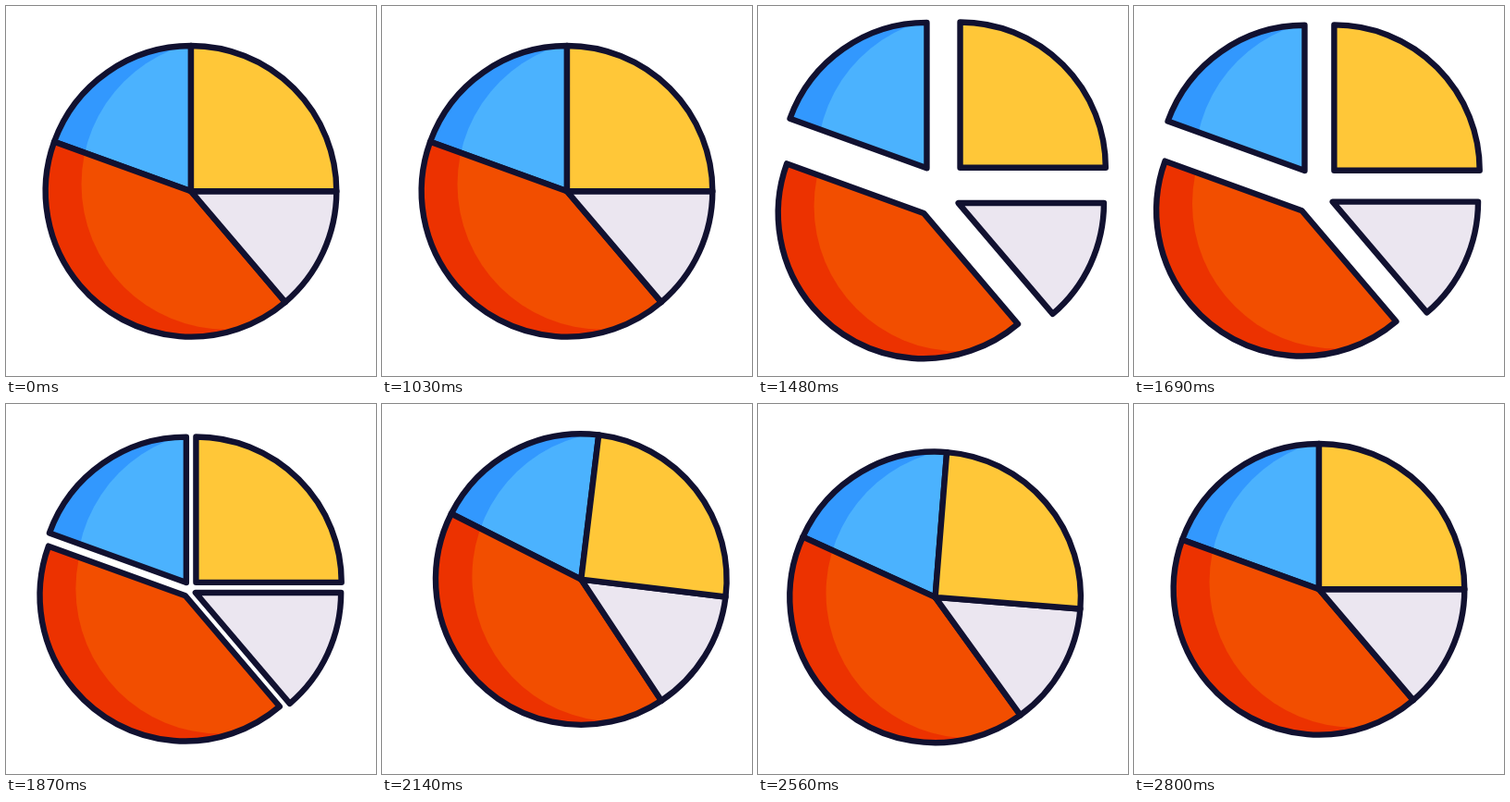
Recreate the animation shown at these times as an HTML page with a canvas. Size 400 by 400 pixels, loop 2.83 s.

```html
<!DOCTYPE html>
<html>
<head>
<meta charset="utf-8">
<style>
html, body { margin: 0; width: 100%; height: 100%; overflow: hidden; background: #fff; }
canvas { display: block; width: 400px; height: 400px; }
</style>
</head>
<body>
<canvas id="stage" width="400" height="400"></canvas>
<script>
const ctx = document.getElementById('stage').getContext('2d');
const LOOP = 2830, START = 1030, STEP = 30;
const CX = 200, CY = 200.3, R = 157.3;
const INK = '#111130';

// Angles in degrees, clockwise from the right; dx, dy is the burst offset.
const slices = [
  { from: 199.9, to: 270, dx: -17.6, dy: -25.2, fill: '#4bb2fe', shade: '#3298fe' },
  { from: 49.6, to: 199.9, dx: -21, dy: 23.7, fill: '#f24e00', shade: '#ec3200' },
  { from: 0, to: 49.6, dx: 16.7, dy: 12.8, fill: '#ebe6f0' },
  { from: 270, to: 360, dx: 18.6, dy: -25.6, fill: '#ffc738' }
];

// Keys are [step, value] pairs, eased in and out between neighbours.
const burst = [[0, 0], [15.5, 1], [19, 1], [33, 0]];
const shiftX = [[30, 0], [39, 17.5], [41.5, 17.5], [49.5, -9], [59, 0]];
const shiftY = [[30, 0], [39, -12.3], [41.5, -12.3], [49.5, 9.2], [59, 0]];
const turn = [[30, 0], [41.5, 10.5], [59, 0]];

const rad = deg => deg * Math.PI / 180;

function valueAt(keys, k) {
  if (k <= keys[0][0]) return keys[0][1];
  for (let i = 1; i < keys.length; i++) {
    const [a, va] = keys[i - 1], [b, vb] = keys[i];
    if (k <= b) {
      const x = (k - a) / (b - a);
      return va + (vb - va) * x * x * (3 - 2 * x);
    }
  }
  return keys[keys.length - 1][1];
}

function drawSlice(s, spread) {
  const path = new Path2D();
  path.moveTo(CX, CY);
  path.arc(CX, CY, R, rad(s.from), rad(s.to));
  path.closePath();

  ctx.save();
  ctx.translate(s.dx * spread, s.dy * spread);
  ctx.fillStyle = s.shade || s.fill;
  ctx.fill(path);
  if (s.shade) {
    ctx.save();
    ctx.clip(path);
    ctx.fillStyle = s.fill;
    ctx.beginPath();
    ctx.arc(238.5, 192.7, 157, 0, Math.PI * 2);
    ctx.fill();
    ctx.restore();
  }
  ctx.strokeStyle = INK;
  ctx.lineWidth = 6.4;
  ctx.lineJoin = 'round';
  ctx.stroke(path);
  ctx.restore();
}

function draw(now) {
  const t = now % LOOP;
  const k = Math.max(0, Math.floor((t - START) / STEP));
  ctx.fillStyle = '#fff';
  ctx.fillRect(0, 0, 400, 400);
  ctx.save();
  ctx.translate(CX + valueAt(shiftX, k), CY + valueAt(shiftY, k));
  ctx.rotate(rad(valueAt(turn, k)));
  ctx.translate(-CX, -CY);
  const spread = valueAt(burst, k);
  slices.forEach(s => drawSlice(s, spread));
  ctx.restore();
}

const begin = performance.now();
function tick() {
  draw(performance.now() - begin);
  requestAnimationFrame(tick);
}
tick();
</script>
</body>
</html>
```
